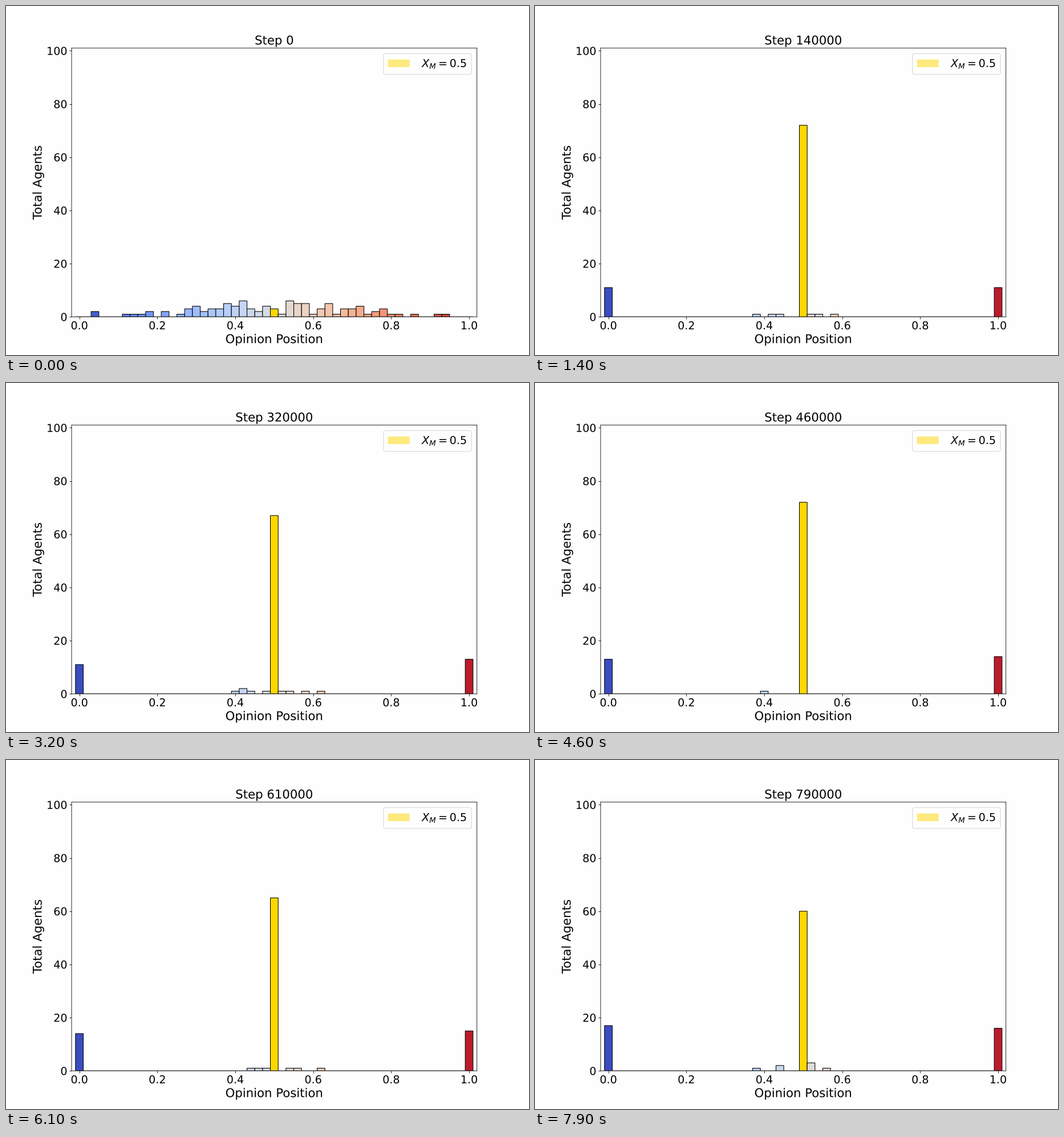
Recreate the animation shown at these times as a matplotlib script. Size 917 by 611 pixels, loop 8000 ms.

```python
import numpy as np
import matplotlib.pyplot as plt
from matplotlib.animation import FuncAnimation
from matplotlib.patches import Patch
from matplotlib.patheffects import Normal

W, H = 917, 611
DPI = W / 12
FRAMES, INTERVAL = 80, 100
STEPS_PER_FRAME = 10000
AGENTS, BINS, MID = 100, 51, 25
BACK = "#fefefe"

# Cluster sizes over time: (frame, agents)
LEFT = [(0, 0), (7, 10), (11, 11), (38, 11), (46, 13), (61, 14), (79, 17)]
RIGHT = [(0, 0), (9, 11), (21, 11), (32, 13), (46, 14), (54, 15), (79, 16)]
CENTRE = [(0, 3), (3, 48), (7, 66), (14, 72), (21, 75), (32, 67), (46, 72),
          (61, 65), (79, 60)]


def size(points, i):
    return int(np.interp(i, *zip(*points)))


def counts(i):
    """Three clusters, and the rest wandering around the middle."""
    left, right, centre = (size(p, i) for p in (LEFT, RIGHT, CENTRE))
    n = AGENTS - left - right - centre
    rng = np.random.default_rng(40 + i)
    early = 0.65 ** i
    reach = int(6 + 17 * early)
    offset = np.trunc(np.abs(rng.normal(0, 3 + 7 * early, n))) + 1
    side = rng.choice([-1, 1], n)
    spots = MID + side * np.minimum(offset, reach).astype(int)
    c = np.bincount(spots, minlength=BINS)
    c[0], c[MID], c[-1] = left, centre, right
    return c


# Text as outlines, so that it can sit between pixels
plt.rcParams.update({"font.family": "DejaVu Sans", "text.hinting": "none",
                     "path.effects": [Normal()]})

# The tiny surplus keeps the pixel size from rounding down
fig = plt.figure(figsize=((W + 1e-6) / DPI, (H + 1e-6) / DPI), dpi=DPI,
                 facecolor=BACK)
nudge = 0.4
ax = fig.add_axes([0.125 + nudge / W, 0.11 - nudge / H, 0.775, 0.77],
                  facecolor=BACK)
ax.tick_params(labelsize=18)
ax.set_xlabel("Opinion Position", fontsize=20)
ax.set_ylabel("Total Agents", fontsize=20)
title = ax.set_title("Step 0", fontsize=20)

colors = plt.get_cmap("coolwarm")(np.arange(BINS) / BINS)
colors[MID] = (1, 215 / 255, 0, 1)
bars = ax.bar(np.arange(BINS) / 50, counts(0), width=0.02, color=colors,
              edgecolor="black", linewidth=1)
ax.set_xlim(-0.02, 1.02)
ax.set_ylim(0, 101)

key = Patch(facecolor="gold", alpha=0.5, linewidth=0, label=" $X_M = 0.5$")
ax.legend(handles=[key], loc="upper right", fontsize=18)

for artist in fig.findobj():
    artist.set_snap(False)


def update(i):
    for bar, h in zip(bars, counts(i)):
        bar.set_height(h)
    title.set_text(f"Step {i * STEPS_PER_FRAME}")
    return [*bars, title]


anim = FuncAnimation(fig, update, frames=FRAMES, interval=INTERVAL,
                     repeat=True, repeat_delay=0, blit=False)
plt.show()
```
